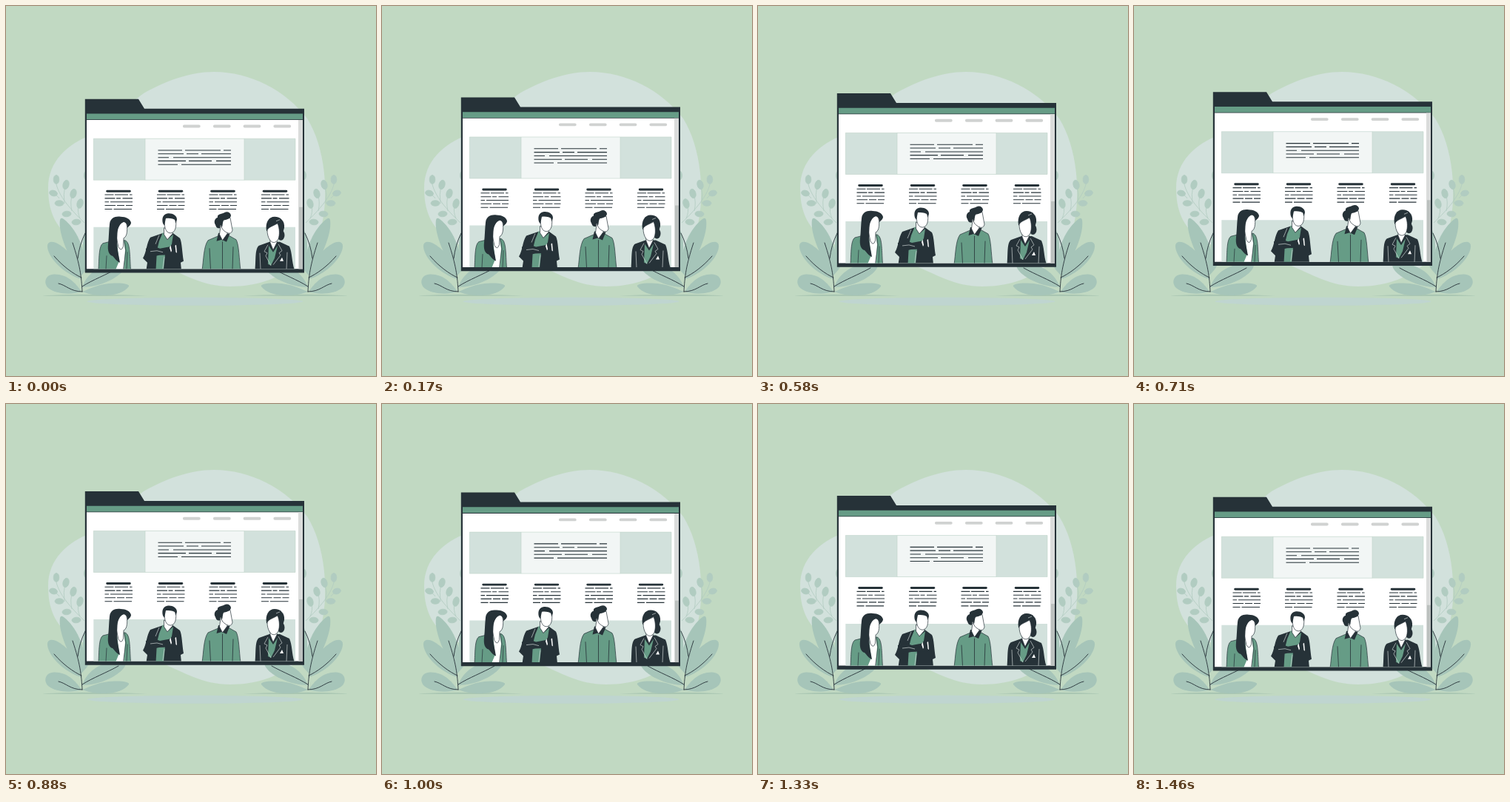
An HTML page for the animation above (1500 ms loop, 500 px wide and 500 px high).

```html
<!DOCTYPE html>
<html lang="en">
<head>
<meta charset="utf-8">
<title>Team page</title>
<style>
  html, body { margin: 0; height: 100%; overflow: hidden; background: #c1d9c2; }
  svg { display: block; width: 100vw; height: 100vh; }
  .dark { fill: #263238; }
  .green { fill: #669c86; }
  .white { fill: #fff; }
  .pale { fill: #d2e1dc; }
  .leaf { fill: #a6c5b9; }
  .sprig { fill: #b1ccc1; stroke: #b1ccc1; stroke-width: .8; }
  .line { fill: none; stroke: #263238; stroke-linecap: round; stroke-linejoin: round; }
  .text { fill: none; stroke: #263238; stroke-width: 1.1; }
  .edge { stroke: #263238; stroke-width: .7; stroke-linejoin: round; }
  .seam { fill: none; stroke: #e8efec; stroke-width: .6; }
</style>
</head>
<body>
<svg viewBox="0 0 500 500">
  <defs>
    <clipPath id="page"><path d="M109 154H401V355.5H109z"/></clipPath>

    <g id="plant">
      <path fill="#a9c6b2" d="M50 391.3Q76 389.8 104 389.8T191 391.3Q160 392 104 392T50 391.3z"/>
      <g class="sprig">
        <path fill="none" d="M68 241C72 257 86 274 106 293M61 253Q68 254 72 260M80 242Q77 255 79 267M90 253Q86 265 89 277M98 268Q96 279 100 287"/>
        <ellipse cx="68" cy="234.5" rx="3.8" ry="6"/>
        <ellipse cx="81" cy="241.5" rx="4" ry="6.3" transform="rotate(15 81 241.5)"/>
        <ellipse cx="91" cy="253.5" rx="4" ry="6.3" transform="rotate(15 91 253.5)"/>
        <ellipse cx="100" cy="267" rx="4" ry="6.5" transform="rotate(15 100 267)"/>
        <ellipse cx="64" cy="253" rx="5.5" ry="3.8" transform="rotate(15 64 253)"/>
        <ellipse cx="72" cy="266.5" rx="6" ry="3.8"/>
        <ellipse cx="82" cy="281" rx="6" ry="3.8" transform="rotate(-5 82 281)"/>
        <ellipse cx="95" cy="292" rx="6" ry="3.8" transform="rotate(-5 95 292)"/>
        <ellipse cx="108.5" cy="229" rx="3" ry="6"/>
      </g>
      <g class="leaf">
        <path d="M102 364C86 343 70 308 73 289Q74 285 78 288C95 301 106 326 109 356z"/>
        <path d="M109 356C103 335 102 316 108 303L125 330z"/>
        <path d="M102 369C82 364 58 343 56 326C55 317 64 317 73 323C88 333 99 349 102 369z"/>
        <path d="M102 386C88 391 66 389 57 381C50 374 53 363 65 362.500C82 362 94 374 102 386z"/>
        <path d="M103 386C114 382 126 375 146 374.500C158 374 168 376 166 379C160 387 148 391 134 391C120 391 110 389 103 386z"/>
        <path d="M103 380C110 360 130 346 160 348C166 352 155 364 140 371C128 377 114 380 103 380z"/>
      </g>
      <path class="line" stroke-width=".9" d="M103 386C102 366 100 350 90 320M97 341Q99 323 107 307M65 338C77 352 91 362 102 367M71 375C81 377 87 386 103 386M103 379C117 370 136 363 152 354"/>
    </g>

    <g id="column">
      <path class="line" stroke-width="2.9" d="M136.700 250.500h30.600"/>
      <path class="text"
        d="M133.500 255.300h12m1.500 0h18m2 0h3.500
           M133.500 260.200h14m1.500 0h6m2.500 0h13.500
           M133.500 265h5.500m2 0h30
           M133.500 269.800h14.500m2 0h10m2 0h9
           M133.500 274.800h10m2 0h24.500"/>
    </g>
  </defs>

  <path class="pale" d="M57 246C57 209 84 186 115 174.500C150 161 160 136 186 118C214 102 248 89 281 89C330 89 378 114 407 152C432 192 436 255 427 295C418 335 375 379 303 379C265 379 240 362 210 350C170 335 120 335 90 315C65 298 57 275 57 246z"/>
  <ellipse cx="255.500" cy="399.300" rx="146" ry="5.500" fill="#bfd5d0"/>
  <use href="#plant"/>
  <use href="#plant" transform="translate(511) scale(-1 1)"/>

  <g id="window">
    <path class="dark" d="M106.800 126H179L187 139H403V360.700H106.800z"/>
    <path class="green" d="M109 145.700H401V153.500H109z"/>
    <path class="white" d="M109 154.300H401V355.500H109z"/>
    <path fill="#dadcdb" d="M395 154.300H401V355.500H395z"/>
    <path fill="#bcc1bf" d="M396 272H401V355.500H396z"/>
    <path fill="none" stroke="#d0d2d1" stroke-width="3.800" stroke-linecap="round"
      d="M240.800 162.800h20M281.800 162.800h20M322.500 162.800h20M363.300 162.800h20"/>

    <path class="pale" d="M118.300 179.500H391V235.500H118.300z"/>
    <path fill="#f2f6f5" d="M188 179.500H322V235.500H188z"/>
    <path fill="none" stroke="#bfd3ca" stroke-width=".6" d="M118.300 179.500H391V235.500H118.300zM188 179.500v56M322 179.500v56"/>
    <path class="text"
      d="M205.500 195.300h32.500m4 0h48m4 0h10
         M205.500 200.100h34.500m4 0h16m4 0h40
         M205.500 205h14.500m6 0h78
         M205.500 209.700h37.500m4 0h31m6 0h20
         M205.500 214.500h26.500m5 0h67"/>

    <use href="#column"/>
    <use href="#column" x="70.500"/>
    <use href="#column" x="141"/>
    <use href="#column" x="211.500"/>
    <path class="pale" d="M118.300 299H391V355.500H118.300z"/>

    <g clip-path="url(#page)">
      <g id="long-hair">
        <path class="green edge" d="M125 357C126 343 125 325 131 321L147 317L161 317C168 320 167 335 168.500 357z"/>
        <path class="white" d="M149 312L159 317L161 330L159 357H148L153 345z"/>
        <path class="line" stroke-width=".7" d="M160 318L162 331L158.500 356M164 333L163 356M136 338L135 356"/>
        <path class="white edge" d="M151 294L162 291C165 301 164 312 159 314L158.500 325Q156 333 152 326L149 312z"/>
        <path class="dark" d="M140 295C141 286 148 284 155 285C162 285 168 288 169 293C169 296 166 298 164 300C164 295 162 293 159 292C154 294 151 300 150.500 307C150 315 150 324 151 331L154 347C150 346 147 341 144 338C139 337 137 331 138 322C139 313 139 304 140 295z"/>
      </g>

      <g id="crossed-arms">
        <path class="dark" d="M189.500 357L191 347L185 341C190 333 190 320 195 313L211 307.500H226L235 314C238 320 238 334 240 345L236 347L237 357z"/>
        <path class="green" d="M212 306L207 318L204 330L202.500 357H213L215 336L224 322L226 309L218 316z"/>
        <path class="white edge" d="M213.500 300V309L218 316L225 308V303z"/>
        <path class="white edge" d="M214 290C214 284 229 284 229.500 290C231 303 226 308 221 307C216 306 214 300 214 290z"/>
        <path class="dark" d="M212 294C210 286 213 281 219 280.500C225 280 231 283 231 289L229.500 294L228 289C224 287 220 287 216 287L214 297z"/>
        <path class="dark" d="M189 328L200 325L208 328L224 325L233 336L207 337L189 341z"/>
        <path class="white" d="M221 327L222.500 323.500L224 331L223 333zM228.500 324L230 323L231 334L229.500 333z"/>
        <path class="seam" d="M195 332L204 331L212 333M207 310L202 322M214 339L212 355"/>
      </g>

      <g id="quiff">
        <path class="green edge" d="M265 357C267 344 267 325 273 317L287 311H302L311 316C315 323 315 343 317 357z"/>
        <path class="line" stroke-width=".8" d="M275 328L276.500 356M307 326L306 356M292.500 319V356"/>
        <path class="dark" d="M287 307L284.500 318L291.500 316L298 319L302.500 308z"/>
        <path class="white edge" d="M290 298L288.500 309L292.500 317L299 308L298 300z"/>
        <path class="white edge" d="M292 289L303 286.500L306 303C305 309 300 308 296 305C291 302 289 295 292 289z"/>
        <path class="dark" d="M283 296C280 291 283 287 286 286C285 281 291 282 295 279.500C299 277.500 303 279 304 283C304 288 297 289 294 290C292.500 293 293 296 292 299L290 296L289 300.500C285 301 284 299 283 296z"/>
      </g>

      <g id="low-bun">
        <ellipse class="dark" cx="371.500" cy="310" rx="5" ry="7"/>
        <path class="dark" d="M336.500 357C338 344 336 328 342 324L356 319H370L383 325C387 334 386 346 390 357z"/>
        <path class="green" d="M355 324L361 333L367 324L363 341L358 351L354 349z"/>
        <path class="white edge" d="M357 313V320L361 330L366 320V311z"/>
        <path class="dark" d="M352 304C350 293 355 285 363 285C371 285 377 291 376 300L374 307L368 312z"/>
        <path class="white edge" d="M353 303C355 299 360 298 367 294C370 301 370 310 368 315C365 321 360 321 357 317C354 313 353 308 353 303z"/>
        <path class="seam" d="M354 323L349 332L353 334L351 338L358 351M368 322L373 331L369 334L371 337L361 350M343 334L344 356M380 333L379 356M365 291L370 289"/>
        <path class="white" d="M370 345L373 340L375 345z"/>
      </g>
    </g>
  </g>
</svg>
<script>
  const LOOP = 1500, STEPS = 36, LIFT = 10;
  const pane = document.getElementById('window');
  const start = performance.now();

  // Constant-speed rise and fall, shown at 24 steps per second.
  function draw(now) {
    const time = Math.max(0, now - start) % LOOP;
    const step = Math.floor((time + 5) * STEPS / LOOP) % STEPS;
    const phase = (step + 0.5) / STEPS;
    const height = LIFT * (1 - Math.abs(1 - 2 * phase));
    pane.setAttribute('transform', `translate(0 ${-height})`);
    requestAnimationFrame(draw);
  }
  draw(start);
</script>
</body>
</html>
```
